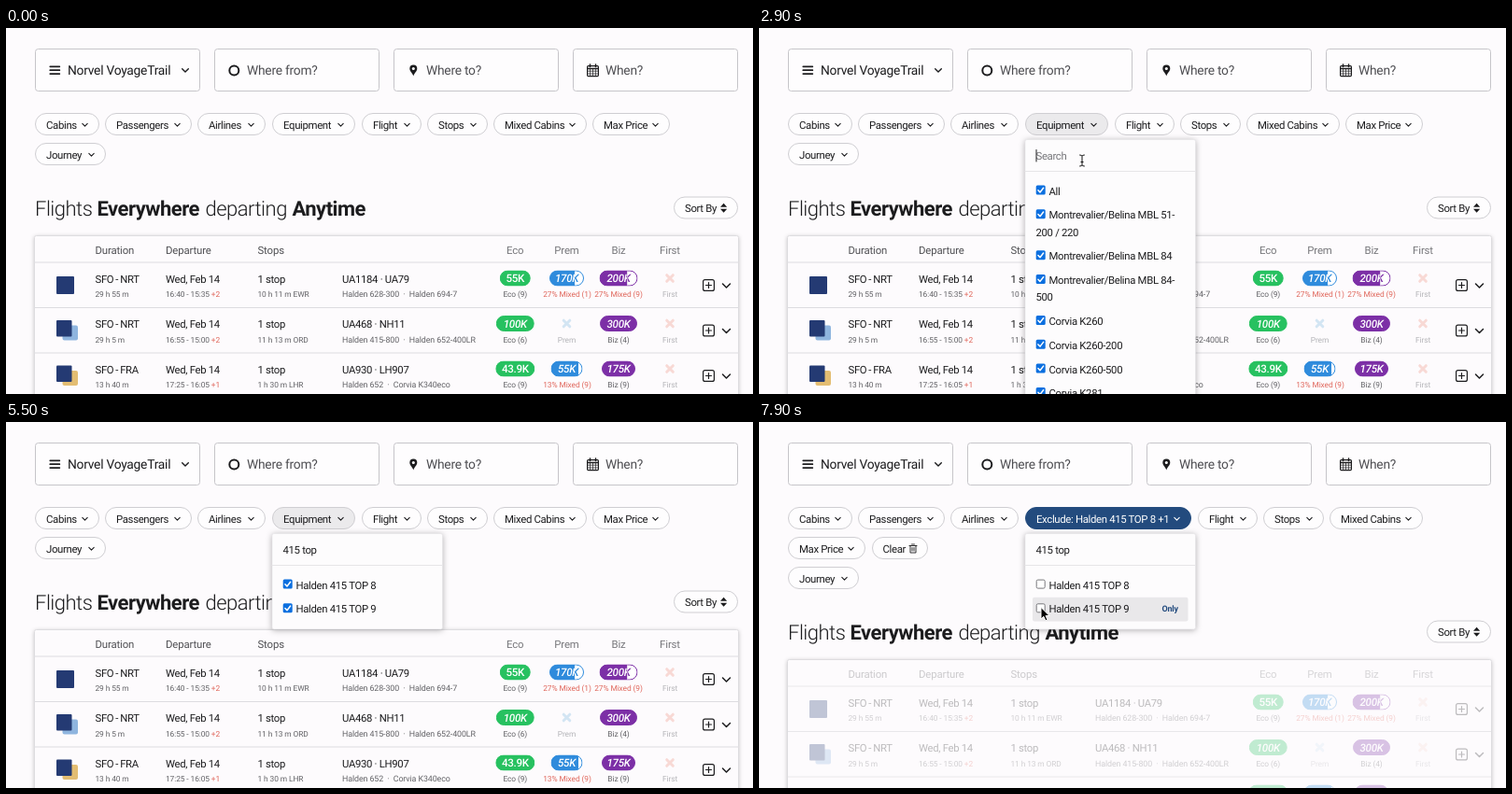
Write an HTML page that moves like this. It is 800 px wide and 392 px high and loops after 8 s.

```html
<!DOCTYPE html>
<html lang="en">
<head>
<meta charset="utf-8">
<title>Flight search filter</title>
<style>
html, body { margin: 0; width: 100%; height: 100%; overflow: hidden; background: #fdfbfd; }
svg { display: block; }
#stage { position: absolute; left: 0; top: 0; }
text { font-family: Roboto, "Liberation Sans", sans-serif; fill: #1c1c1e; text-rendering: geometricPrecision; }
.field { font-size: 13.8px; letter-spacing: -.25px; }
.hint { fill: #4e4e52; }
.pill { font-size: 11.4px; letter-spacing: -.35px; }
.title { font-size: 22px; letter-spacing: -.5px; font-weight: 300; }
.strong { font-weight: 700; }
.head { font-size: 11.4px; letter-spacing: -.15px; fill: #505054; }
.main { font-size: 11.3px; letter-spacing: -.3px; }
.sub { font-size: 8.4px; letter-spacing: -.1px; fill: #626266; }
.plane { font-size: 8.9px; }
.red { fill: #e0675c; }
.pale { fill: #b4b4b8; }
.badge { font-size: 11.6px; letter-spacing: -.3px; font-weight: 500; }
.only { font-size: 9px; font-weight: 700; letter-spacing: -.2px; fill: #234b7e; }
.mid { text-anchor: middle; }
.card { fill: #fdfbfd; stroke: #dedde0; filter: drop-shadow(0 1px 2px rgba(0,0,0,.22)); }
.panel { fill: #fdfcfd; stroke: #e4e3e6; stroke-width: .6; filter: drop-shadow(0 1px 3px rgba(0,0,0,.3)); }
.line { fill: none; stroke-linecap: round; stroke-linejoin: round; }
</style>
</head>
<body>
<svg id="stage" width="800" height="392" viewBox="0 0 800 392"></svg>
<script>
(() => {
const stage = document.getElementById('stage');
const LOOP = 8000, OPEN = 1700, PICK_1 = 6900, PICK_2 = 7700;
const GREEN = '#27c160', BLUE = '#2f8bdc', PURPLE = '#7c2fa6', NAVY = '#234b7e', INK = '#1c1c1e';
const ROW = 25.7, LIST_Y = 162;

const text = (x, y, s, cls, extra = '') => `<text x="${x}" y="${y}" class="${cls}" ${extra}>${s}</text>`;
const rect = (x, y, w, h, r, fill, extra = '') =>
  `<rect x="${x}" y="${y}" width="${w}" height="${h}" rx="${r}" fill="${fill}" ${extra}/>`;
const path = (d, color = INK, w = 1.4) => `<path class="line" d="${d}" stroke="${color}" stroke-width="${w}"/>`;
const chevron = (x, y, r, color, w) => path(`M${x - r} ${y - r / 2}l${r} ${r}l${r} ${-r}`, color, w);
const group = (y, body, opacity = 1) => `<g transform="translate(0 ${y})" opacity="${opacity}">${body}</g>`;

const pen = document.createElement('canvas').getContext('2d');
function inputWidth(s) {
  pen.font = '11.4px Roboto, "Liberation Sans", sans-serif';
  return pen.measureText(s).width - .35 * s.length;
}

// Search fields
function fields() {
  const box = [31, 223, 415, 607].map(x =>
    rect(x + .5, 22.5, 176, 45, 3, '#fefdfe', 'stroke="#c6c5c9"')).join('');
  const bars = [41.3, 45.2, 49.1].map(y => path(`M47.3 ${y}h10`, INK, 1.8)).join('');
  const pin = `<path d="M436.3 51.5c-1-3.6-4-5-4-8a4 4 0 0 1 8 0c0 3-3 4.4-4 8z" fill="${INK}"/>
    <circle cx="436.3" cy="43.5" r="1.5" fill="#fff"/>`;
  const cal = rect(622.6, 40.6, 11.8, 11, 1, 'none', `stroke="${INK}" stroke-width="1.2"`) +
    path('M622.6 43.5h11.8M625.5 39v2.5M631.5 39v2.5', INK, 1.5) +
    path('M622.6 46.2h11.8M622.6 49h11.8M625.6 43.5v8M628.5 43.5v8M631.4 43.5v8', INK, .7);
  return box + bars + text(66, 50, 'Norvel VoyageTrail', 'field') + chevron(192, 45.3, 3.3) +
    `<circle cx="244.3" cy="45.5" r="5" fill="none" stroke="${INK}" stroke-width="2"/>` +
    text(258, 50, 'Where from?', 'field hint') + pin + text(450, 50, 'Where to?', 'field hint') +
    cal + text(642, 50, 'When?', 'field hint');
}

// Filter pills
function pill(x, w, row, label, fill = '#fefdfe', on = false) {
  const y = 91.5 + 32 * row, color = on ? '#fff' : INK;
  return rect(x + .5, y, w - 1, 23, 11.5, fill, `stroke="${on ? NAVY : '#cfced2'}"`) +
    text(x + 12, y + 16, label, 'pill', on ? 'style="fill:#fff"' : '') +
    chevron(x + w - 15.5, y + 12.2, 2.7, color, 1.1);
}

const trash = (x, y) => path(`M${x - 4} ${y - 3}h8M${x - 1.5} ${y - 4.5}h3M${x - 3} ${y - 3}v7.5h6v-7.5` +
  `M${x - 1} ${y - 1}v3.5M${x + 1} ${y - 1}v3.5`, INK, .9);

function filters(s) {
  let out = pill(31, 69, 0, 'Cabins') + pill(106, 93, 0, 'Passengers') + pill(205, 73, 0, 'Airlines');
  let x = 285;
  if (s.picked) {
    const w = s.picked > 1 ? 178 : 162;
    out += pill(x, w, 0, 'Exclude: Halden 415 TOP 8' + (s.picked > 1 ? ' +1' : ''), NAVY, true);
    x += w + 7;
  } else {
    out += pill(x, 89, 0, 'Equipment', s.hot ? '#ebeaec' : '#fefdfe');
    x += 96;
  }
  out += pill(x, 64, 0, 'Flight') + pill(x + 70, 65, 0, 'Stops') + pill(x + 141, 100, 0, 'Mixed Cabins');
  if (!s.picked) return out + pill(628, 83, 0, 'Max Price') + pill(31, 76, 1, 'Journey');
  return out + pill(31, 83, 1, 'Max Price') +
    rect(121.5, 123.5, 59, 23, 11.5, '#fefdfe', 'stroke="#cfced2"') + text(132.5, 139.5, 'Clear', 'pill') +
    trash(165, 135.5) + pill(31, 76, 2, 'Journey');
}

// Results table
function badge(cx, w, y, label, color, slant, mixed = 0) {
  const x = cx - w / 2;
  const face = (bg, ink) => rect(.5, .5, w - 1, 16, 8, bg, `stroke="${color}"`) +
    text(w / 2, 12.6, label, 'badge mid', `style="fill:${ink}${slant ? ';font-style:italic' : ''}"`);
  const part = (from, to, bg, ink) => `<svg x="${x + from}" y="${y - 8.5}" width="${to - from}" height="17">
    <g transform="translate(${-from} 0)">${face(bg, ink)}</g></svg>`;
  const cut = w * (1 - mixed);
  return part(0, cut, color, '#fff') + (mixed ? part(cut, w, '#fff', color) : '');
}

const cross = (x, y, color) => path(`M${x - 3.3} ${y - 3.3}l6.6 6.6m0 -6.6l-6.6 6.6`, color, 3);

const flights = [
  { way: ['SFO', 'NRT'], long: '29 h 55 m', time: '16:40 - 15:35', day: '+2', stop: '10 h 11 m EWR',
    code: 'UA1184 · UA79', planes: 'Halden 628-300&nbsp; · &nbsp;Halden 694-7',
    eco: [33, '55K', 0, 'Eco (9)'], prem: [37, '170K', .27, '27% Mixed (1)'], biz: [41, '200K', .27, '27% Mixed (9)'] },
  { way: ['SFO', 'NRT'], long: '29 h 5 m', time: '16:55 - 15:00', day: '+2', stop: '11 h 13 m ORD', mate: '#8fb5df',
    code: 'UA468 · NH11', planes: 'Halden 415-800&nbsp; · &nbsp;Halden 652-400LR',
    eco: [41, '100K', 1, 'Eco (6)'], biz: [40, '300K', 0, 'Biz (4)'] },
  { way: ['SFO', 'FRA'], long: '13 h 40 m', time: '17:25 - 16:05', day: '+1', stop: '1 h 30 m LHR', mate: '#e3bd72',
    code: 'UA930 · LH907', planes: 'Halden 652&nbsp; · &nbsp;Corvia K340eco',
    eco: [42, '43.9K', 0, 'Eco (9)'], prem: [34, '55K', .13, '13% Mixed (9)'], biz: [36, '175K', 0, 'Biz (9)'] }
];

function flightRow(f, i) {
  const note = (x, s, cls) => text(x, 288, s, 'sub mid ' + cls);
  let out = f.mate
    ? rect(60.5, 270, 16.5, 16, 2, f.mate) + rect(54, 264.5, 16.5, 17.5, 1, '#243a73')
    : rect(54, 266, 19, 19, 1, '#243a73');
  out += text(95.5, 272.5, f.way.join('\u2009-\u2009'), 'main') + text(95.5, 288, f.long, 'sub') +
    text(171, 272.5, 'Wed, Feb 14', 'main') +
    text(171, 288, `${f.time} <tspan class="red">${f.day}</tspan>`, 'sub') +
    text(269.5, 272.5, '1 stop', 'main') + text(269.5, 288, f.stop, 'sub') +
    text(360, 272.5, f.code, 'main') + text(360, 288, f.planes, 'sub plane');
  out += badge(545.3, f.eco[0], 268, f.eco[1], GREEN, f.eco[2]) + note(545.3, f.eco[3], '');
  out += f.prem
    ? badge(600.5, f.prem[0], 268, f.prem[1], BLUE, 1, f.prem[2]) + note(601, f.prem[3], 'red')
    : cross(600.5, 268, '#d3e5f3') + note(600.5, 'Prem', 'pale');
  out += badge(656, f.biz[0], 268, f.biz[1], PURPLE, 1, f.biz[2]) + note(656, f.biz[3], f.biz[2] ? 'red' : '');
  out += cross(711, 268, '#f8d9d5') + note(711, 'First', 'pale');
  out += rect(746.6, 269.6, 11.8, 11.8, 2, 'none', `stroke="${INK}" stroke-width="1.2"`) +
    path('M749.5 275.5h6M752.5 272.5v6', INK, 1.2) + chevron(771.5, 276, 4, INK, 1.5);
  return group(48.5 * i, out);
}

const heads = [[95.5, 'Duration'], [171, 'Departure'], [269.5, 'Stops']];
const cabins = [[545.3, 'Eco'], [600.5, 'Prem'], [656, 'Biz'], [711, 'First']];
const tableBody = heads.map(h => text(h[0], 241.5, h[1], 'head')).join('') +
  cabins.map(c => text(c[0], 241.5, c[1], 'head mid', 'style="fill:#77777b"')).join('') +
  flights.map(flightRow).join('');

function results(s) {
  const title = text(31, 201, 'Flights', 'title') + text(97.5, 201, 'Everywhere', 'title strong') +
    text(213.5, 201, 'departing', 'title') + text(306.5, 201, 'Anytime', 'title strong');
  const sort = rect(715.5, 181, 68, 23, 11.5, '#fefdfe', 'stroke="#cfced2"') + text(727, 197, 'Sort By', 'pill') +
    `<path d="M765 191.7l3.6-4 3.6 4zM765 193.7l3.6 4 3.6-4z" fill="${INK}"/>`;
  const rules = [251, 299.5, 348].map(y => path(`M31 ${y}H784`, '#dddce0', 1)).join('');
  const card = '<rect class="card" x="30.5" y="222.5" width="754" height="220" rx="2"/>';
  return group(s.picked ? 32 : 0, title + sort + card + group(0, rules, .5 + s.fade / 2) + group(0, tableBody, s.fade));
}

// Equipment menu
const models = [
  ['All'], ['Montrevalier/Belina MBL 51-', '200 / 220'], ['Montrevalier/Belina MBL 84'],
  ['Montrevalier/Belina MBL 84-', '500'], ['Corvia K260'], ['Corvia K260-200'], ['Corvia K260-500'],
  ['Corvia K281'], ['Halden 415 TOP 8'], ['Halden 415 TOP 9']
];

function checkbox(x, y, on) {
  return on ? rect(x, y, 10, 10, 1.5, '#0b6fdf') + path(`M${x + 2.2} ${y + 5.2}l2.1 2.2l3.6-4.7`, '#fff', 1.5)
    : rect(x + .5, y + .5, 9, 9, 1.5, '#fff', 'stroke="#77777b"');
}

function menu(s) {
  if (!s.open) return '';
  const list = models.filter(m => m.join('').toLowerCase().includes(s.query.trim()));
  let y = LIST_Y, items = '';
  list.forEach((m, i) => {
    if (s.hover === i) items += rect(293, y, 166.5, ROW, 2, '#e9e8ea') + text(431.5, y + 15.3, 'Only', 'only');
    items += checkbox(296.7, y + 6.6, i >= s.picked) + text(310.5, y + 16.7, m[0], 'main');
    if (m[1]) items += text(296.5, y + 35, m[1], 'main');
    y += ROW + 18.3 * (m.length - 1);
  });
  const input = s.query ? text(296.5, 141, s.query, 'pill')
    : text(296.5, 141, 'Search', 'pill', 'style="fill:#77777b"');
  const caret = s.caret ? path(`M${297 + inputWidth(s.query)} 130.5v12.5`, INK, 1) : '';
  return `<rect class="panel" x="285" y="119.5" width="182.5" height="${y - 111}" rx="2"/>` +
    path('M285 153.5h182', '#e6e5e8', 1) + input + caret + items;
}

// Pointer
const track = [
  [500, 425, 42], [1000, 354, 107], [2300, 354, 107], [2700, 346, 142],
  [5700, 346, 142], [6200, 302, 175], [7200, 302, 175], [7500, 302, 198.5], [LOOP, 302, 198.5]
];

function pointerAt(t) {
  if (t < 500 || (t >= 3300 && t < 5700)) return null;
  const i = track.findIndex(k => t < k[0]);
  const [t0, x0, y0] = track[i - 1], [t1, x1, y1] = track[i];
  const u = (t - t0) / (t1 - t0), e = u * u * (3 - 2 * u);
  return { x: x0 + (x1 - x0) * e, y: y0 + (y1 - y0) * e };
}

const onPill = p => p.y > 91 && p.y < 115 && p.x > 285 && p.x < 374;

const ARROW = 'M0 0V12.5L2.9 9.8L4.9 14.3L7 13.4L5 9H9z';
const HAND = 'M-1.3 1a1.3 1.3 0 0 1 2.6 0v4.5q1.5-1 2.3 .5q1.6-.7 2.1 .6q1.7-.5 1.8 1.2v2.5' +
  'q-.2 2.5-1.5 4.2H-1.5q-1.5-2.5-3.3-4.7q-.6-1.5 .8-1.7l2.7 1.7z';
const BEAM = 'M-2.8-6q2.3 0 2.8 1.2q.5-1.2 2.8-1.2M0-4.8v9.6M-2.8 6q2.3 0 2.8-1.2q.5 1.2 2.8 1.2M-1.5 1.5h3';

function pointer(p, open) {
  if (!p) return '';
  let d = ARROW, fill = '#000', edge = '#fff';
  if (onPill(p)) [d, fill, edge] = [HAND, '#fff', '#222'];
  else if (open && p.y > 121 && p.y < 153) [d, fill, edge] = [BEAM, 'none', '#111'];
  return `<path transform="translate(${p.x.toFixed(2)} ${p.y.toFixed(2)})" d="${d}" fill="${fill}" stroke="${edge}" stroke-linejoin="round"/>`;
}

const typed = '415 top', keyTimes = [3300, 3420, 3540, 3660, 4400, 4700, 4900];

function stateAt(t) {
  const p = pointerAt(t), open = t >= OPEN;
  const pressed = keyTimes.filter(k => t >= k);
  const query = typed.slice(0, pressed.length);
  const lastKey = Math.max(OPEN, ...pressed);
  const picked = (t >= PICK_1) + (t >= PICK_2);
  const hover = p && query && p.y >= LIST_Y ? Math.floor((p.y - LIST_Y) / ROW) : -1;
  return {
    p, open, query, picked, hover,
    hot: open || (p && onPill(p)),
    caret: t < PICK_1 && (t - lastKey) % 1000 < 500,
    fade: 1 - .72 * Math.min(1, Math.max(0, (t - PICK_1) / 250))
  };
}

const searchBar = fields();
let shown = '';
function draw(now) {
  const s = stateAt(now % LOOP);
  const scene = searchBar + filters(s) + results(s) + menu(s) + pointer(s.p, s.open);
  if (scene !== shown) stage.innerHTML = shown = scene;
  requestAnimationFrame(draw);
}
draw(0);
})();
</script>
</body>
</html>
```
